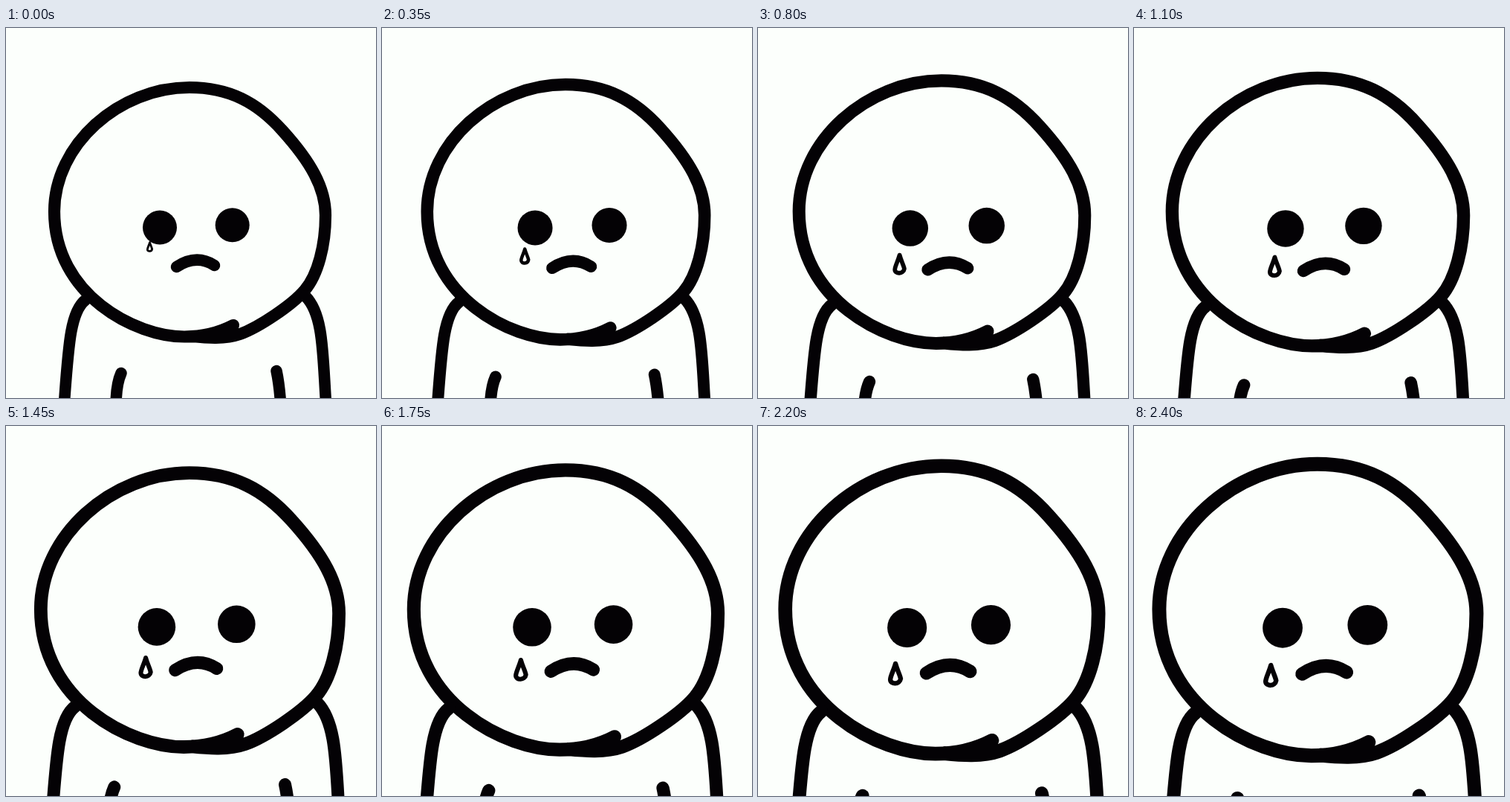
An HTML page for the animation above (2450 ms loop, 498 px wide and 498 px high).

```html
<!DOCTYPE html>
<html lang="en">
<head>
<meta charset="utf-8">
<title>Sad face zoom</title>
<style>
  html, body { margin: 0; width: 100%; height: 100%; overflow: hidden; background: #fcfffc; }
  svg { display: block; width: 498px; height: 498px; }
  path { fill: none; stroke: #040205; stroke-width: 15.5; stroke-linecap: round; stroke-linejoin: round; }
  circle { fill: #040205; }
  #head { stroke-width: 16.2; }
  #tear { stroke-width: 5.5; }
</style>
</head>
<body>
<svg viewBox="0 0 498 498">
  <g id="figure">
    <!-- One long stroke whose two ends overlap at the chin -->
    <path id="head" d="M306 400C285 411 262 415.5 240 415.5
      C175 415.5 65 360 65 247
      C65 157 152 80 247 80
      C300 80 338 100 372 138
      C410 180 430 215 430 252
      C430 292 420 332 402 353
      C385 373 340 403 315 412
      C295 419 270 417 250 415"/>
    <g id="shoulders">
      <path d="M107 366C86 382 84 430 78 510"/>
      <path d="M403 361C428 386 426 440 431 510"/>
    </g>
    <g id="arms">
      <path d="M155 464.5Q148 480 148 510"/>
      <path d="M364 461.5Q368 480 370 510"/>
    </g>
    <g id="face">
      <circle cx="207" cy="268.5" r="23"/>
      <circle cx="304.7" cy="265.2" r="23"/>
      <path d="M229.5 321.5Q256 304 280.5 319.5"/>
      <path id="tear" d="M0-11.5C-2-4-6 3-6 7C-6 13 5 13 6 6C5 1 2-4 0-11.5Z"/>
    </g>
  </g>
</svg>
<script>
const LOOP = 2450, STEP = 50;
const CENTER_X = 248, CENTER_Y = 249.5, FULL_ZOOM = 1.17;
const figure = document.getElementById('figure');
const tear = document.getElementById('tear');

function draw() {
  const time = Math.floor(performance.now() % LOOP / STEP) * STEP / 1000;
  const zoom = FULL_ZOOM ** (time / 2.4);
  figure.setAttribute('transform',
    `translate(${CENTER_X} ${CENTER_Y}) scale(${zoom}) translate(${-CENTER_X} ${-CENTER_Y})`);

  // The tear swells while falling quickly, then drifts down slowly.
  const swell = Math.min(time, 0.58);
  const y = 294.5 + 32 * swell + 5.5 * (time - swell);
  tear.setAttribute('transform', `translate(193.5 ${y}) scale(${0.52 + 0.83 * swell})`);
  requestAnimationFrame(draw);
}
draw();
</script>
</body>
</html>
```
